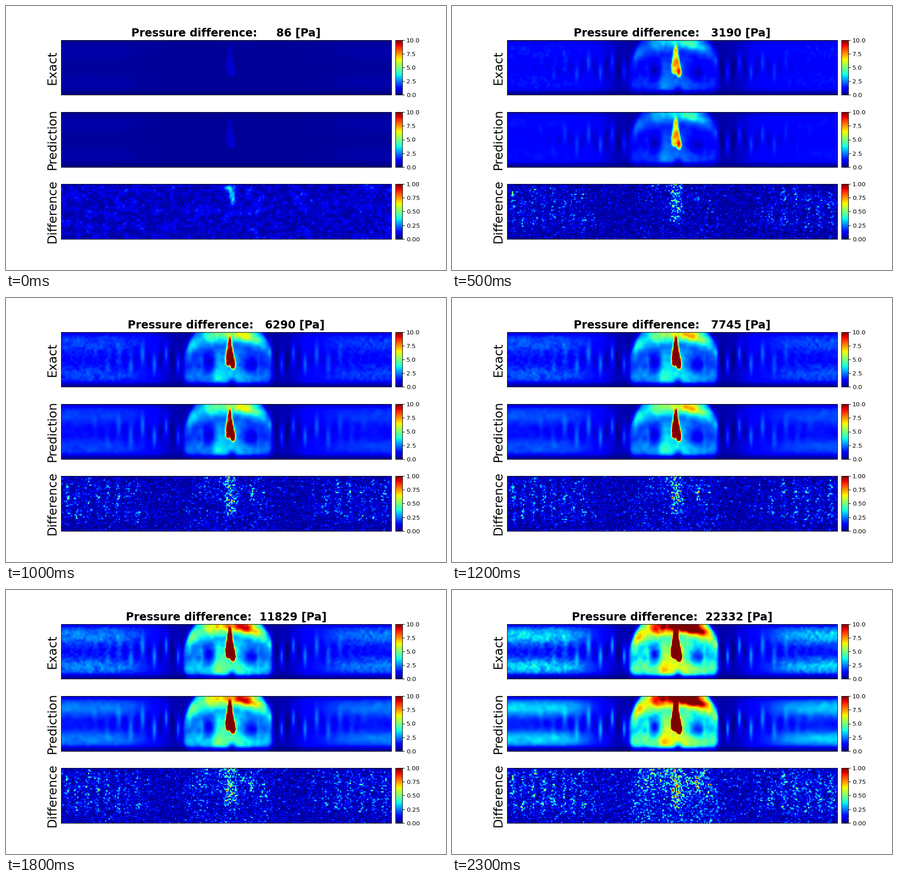
Animation, 966 px wide and 580 px high, one loop 2.4 s. Source, as a matplotlib script:

```python
import numpy as np
import matplotlib.pyplot as plt
from matplotlib.animation import FuncAnimation

W, H, FRAMES = 966, 580, 24
K = 0.966  # font scale
P_MAX = 22332
NX, NY = 270, 45
LEFT, RIGHT = 121.2, 845.6
TOPS = (75, 233.3, 391.2)
TALL = 120.4

plt.rcParams.update({
    "font.family": "DejaVu Sans", "font.size": 10 * K,
    "axes.linewidth": 0.8, "xtick.major.size": 3.5 * K,
    "ytick.major.size": 3.5 * K, "ytick.major.pad": 3.5 * K,
})

# grid in stage pixels, y measured from the top of a panel
x, y = np.meshgrid(LEFT + (np.arange(NX) + 0.5) * (RIGHT - LEFT) / NX,
                   (np.arange(NY) + 0.5) * TALL / NY)


def sig(v):
    return 1 / (1 + np.exp(-np.clip(v, -40, 40)))


def spot(cx, cy, sx, sy, power=2):
    r = np.hypot((x - cx) / sx, (y - cy) / sy)
    return np.exp(-r ** power)


def between(ys, left, right, soft):
    """Soft mask between two edges given at a few heights."""
    return (sig((x - np.interp(y, ys, left)) / soft)
            * sig((np.interp(y, ys, right) - x) / soft))


def white(seed):
    return np.random.default_rng(seed).standard_normal((NY, NX))


def smooth(a, passes):
    for _ in range(passes):
        for axis in (0, 1):
            a = (np.roll(a, 1, axis) + 2 * a + np.roll(a, -1, axis)) / 4
    return a / a.std()


def streaky(seed):
    a = white(seed)
    a = a + 0.45 * np.roll(a, 1, 1) + 0.25 * np.roll(a, 1, 0)
    return a / a.std()


lumps = smooth(white(1), 4)
broad = smooth(white(2), 9)
grain = smooth(white(3), 1)
speck = streaky(4)

# surroundings
side = sig((345 - x) / 12) + sig((x - 640) / 12)
bands = np.exp(-((y - 26) / 20) ** 2) + np.exp(-((y - 94) / 18) ** 2)
reach = sig((288 - x) / 17) + sig((x - 712) / 17) * (0.8 + 0.2 * sig((x - 790) / 20))
floor = 0.15 + 0.85 * sig((112 - y) / 2.2)
ceiling = 0.45 + 0.55 * sig((y - 6) / 1.8)

# the bell and what is in it
dome = between([0, 20, 45, 70, 100, 121], [415, 403, 394, 389, 391, 396],
               [562, 574, 581, 584, 583, 578], 2.7)
arc_y = 3 + 30 * ((x - 490) / 85) ** 2
arch = np.exp(-((y - arc_y) / np.where(y > arc_y, 17, 26)) ** 2)
crown = np.exp(-((x - 500) / 52) ** 4)
holes = ((1 - 0.6 * spot(444, 68, 10, 19)) * (1 - 0.5 * spot(540, 72, 15, 16))
         * (1 - 0.75 * spot(496, 120, 9, 17)))
waist = np.exp(-((x - 490) / (27 + 13 * ((y - 70) / 35) ** 2)) ** 4) * sig((y - 38) / 6)
skirt = np.exp(-((y - 99) / 17) ** 2)
pillar = spot(465, 84, 10, 34, 3)
jet = between([8, 25, 45, 60, 72, 82], [491, 487, 484, 482, 483.5, 496],
              [493, 495.5, 498, 501, 503.5, 501], 0.9)
jet = jet * sig((y - 10) / 1.5) * sig((81 - y) / 1.2) * (1 - 0.8 * spot(491, 81, 3, 9, 4))
heat = 0.75 + 0.3 * spot(497, 60, 7, 24)

phase = np.where(x < 490, 2 * np.pi * (x - 378) / 26, 2 * np.pi * (x - 605) / 25.6)
lens = np.exp(-((y - 60 - 12 * np.cos(phase / 2)) / 22) ** 2)
away = np.maximum(np.maximum(385 - x, x - 585), 0)
flank = sig((np.abs(x - 490) - 48) / 4)
streak = np.exp(3 * (np.cos(phase) - 1)) * lens * np.exp(-(away / 110) ** 2)
streak = streak * flank * (1 - 0.5 * dome)
ovals = np.cos(phase) * lens * np.exp(-(away / 165) ** 4) * (1 - dome)

# error zones
rows = sig((y - 9) / 3) * sig((98 - y) / 5)
columns = 0.55 + 0.45 * np.cos(2 * np.pi * np.where(x < 490, (x - 157) / 22, (x - 702) / 26))
sides = (sig((300 - x) / 18) + 0.9 * sig((x - 685) / 12)) * rows * columns
core = sig((x - 481) / 2) * sig((505 - x) / 2) * sig((86 - y) / 4)
upper = dome * sig((62 - y) / 10)
hot = spot(540, 36, 6, 19, 4) + 0.7 * spot(517, 29, 4, 5)
start = (spot(493, 9, 9, 9) + spot(497, 30, 6, 18, 3) + 0.6 * spot(479, 9, 9, 4)
         + 0.32 * spot(534, 25, 8, 14) + 0.32 * spot(554, 50, 9, 18))
passing = (spot(451, 10, 4, 18, 4) + 0.6 * spot(435, 4, 12, 7)
           + 0.8 * spot(458, 80, 5, 24, 4) + 0.9 * spot(474, 46, 7, 12, 4))


def flow(p):
    """Smooth velocity field for a pressure difference p."""
    q = p / P_MAX
    gate = 1 - np.exp(-p / 600)
    mid = 1.2 * (1 - np.exp(-p / 1700))
    band = 3.3 * q ** 0.5
    back = 0.2 + 0.2 * gate + (mid - 0.3 * gate) * side
    back = back + max(band - mid, 0) * bands * reach
    back = back * ceiling * floor + 0.5 * mid * ovals
    bump = (2.7 * q ** 0.7 + 0.5 * mid
            + q ** 0.6 * arch * (3.1 + 4.2 * crown)
            + q ** 0.6 * (3.0 * spot(522, 7, 24, 12) + 2.2 * spot(448, 7, 13, 10))
            + q ** 0.5 * (2.0 * waist + 1.4 * skirt)
            + 1.3 * q ** 0.4 * pillar)
    bump = bump * holes * floor * (1 + 0.05 * lumps)
    mix = dome * gate
    v = back * (1 - mix) + bump * mix
    v = v + 1.7 * q ** 0.5 * gate * streak
    peak = 13.5 * (p / 6290) ** 0.65 * heat
    v = v * (1 - jet) + peak * (1 + 0.1 * lumps) * jet
    return np.maximum(v, 0.05)


def error(i, p):
    q = p / P_MAX
    gate = 1 - np.exp(-p / 600)
    n = np.abs(0.87 * speck + 0.5 * streaky(100 + i)) ** 1.3
    amp = (0.05 + 0.035 * q + (0.09 + 0.05 * q) * sides
           + (0.17 + 0.06 * q) * core + 0.09 * q * upper + 0.05 * q * dome
           + 0.45 * q ** 0.8 * hot
           + 0.22 * np.exp(-((p - 4343) / 1000) ** 2) * passing
           + 0.35 * q ** 0.3 * spot(121, 12, 4, 8))
    soft = 0.055 * np.abs(smooth(white(7), 1)) + 0.03 * np.abs(broad)
    soft = soft + 0.3 * start * (1 + 0.25 * lumps)
    return gate * n * amp + (1 - gate) * soft


def pressure(i):
    return np.interp(i, [0, 3, 7, 10, 14, 18, 23],
                     [86, 2037, 4343, 6290, 9200, 11829, P_MAX])


def fields(i):
    p = pressure(i)
    v = flow(p)
    gate = 1 - np.exp(-p / 600)
    rough = 0.09 * gate * (reach + 0.25 * dome) * (1 - jet)
    return (v * (1 + rough * grain),
            v * (1 + 0.04 * gate * lumps * reach),
            error(i, p))


fig = plt.figure(figsize=(W / 100, H / 100), dpi=100, facecolor="white")


def box(x0, top, x1):
    return fig.add_axes([x0 / W, 1 - (top + TALL) / H, (x1 - x0) / W, TALL / H])


images = []
for name, top, vmax in zip(("Exact", "Prediction", "Difference"), TOPS, (10, 10, 1)):
    ax = box(LEFT, top, RIGHT)
    im = ax.imshow(np.zeros((NY, NX)), cmap="jet", vmin=0, vmax=vmax, aspect="auto")
    ax.set(xticks=[], yticks=[])
    fig.text(109 / W, 1 - (top + TALL / 2) / H, name, fontsize=20 * K, rotation=90,
             rotation_mode="anchor", ha="center", va="baseline")
    fig.colorbar(im, cax=box(855.2, top, 869.6), ticks=np.linspace(0, vmax, 5))
    images.append(im)

title = images[0].axes.set_title("", fontsize=18 * K, fontweight="bold", pad=6 * K)


def update(i):
    for im, data in zip(images, fields(i)):
        im.set_data(data)
    title.set_text(f"Pressure difference: {round(pressure(i)):6d} [Pa]")
    return [*images, title]


anim = FuncAnimation(fig, update, frames=FRAMES, interval=100,
                     repeat=True, repeat_delay=0, blit=False)
plt.show()
```
